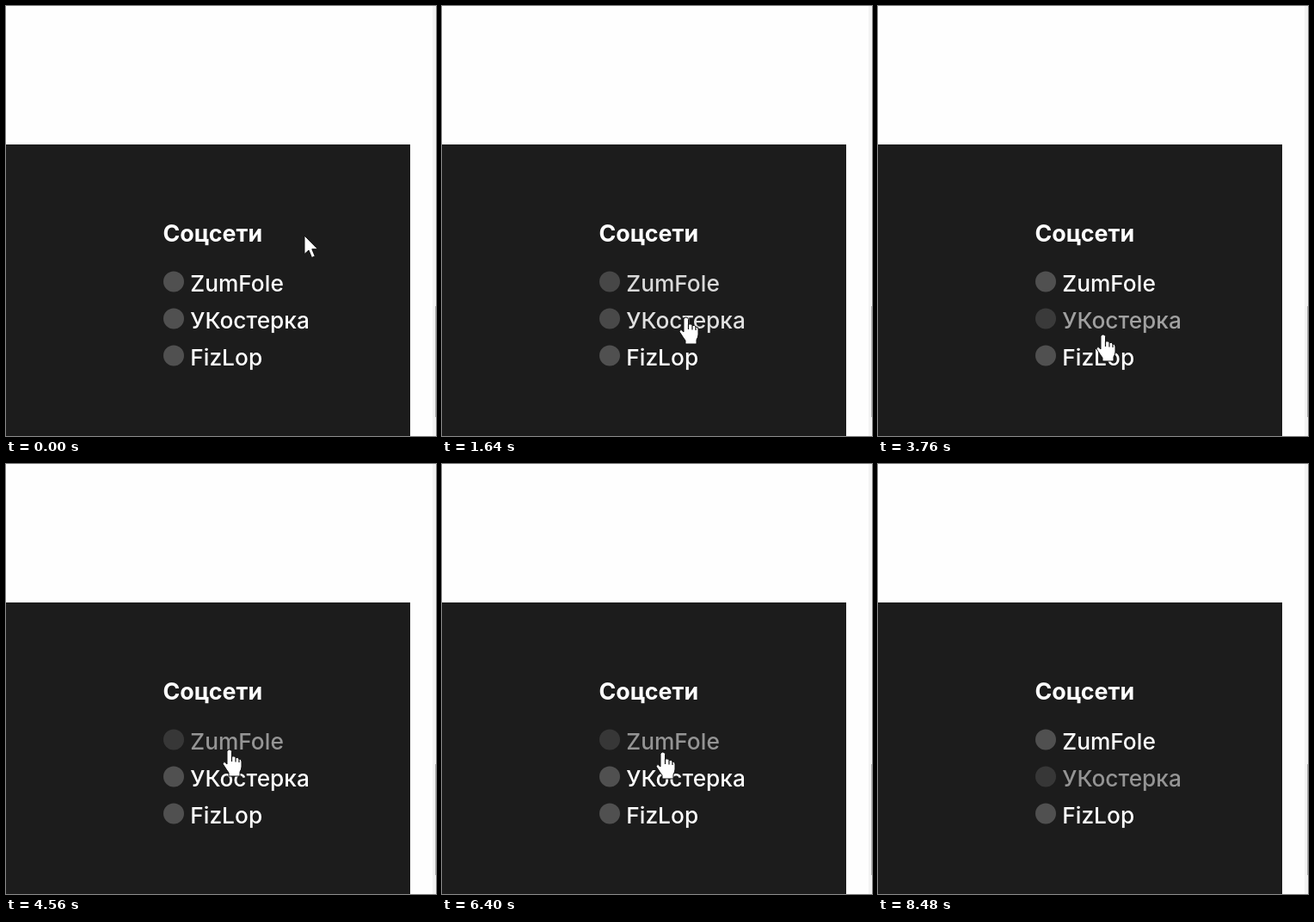
An HTML page that plays this animation: 500x500 px, repeating every 8.52 s.

```html
<!DOCTYPE html>
<html lang="ru">
<head>
<meta charset="utf-8">
<title>Соцсети</title>
<style>
  html, body { margin: 0; width: 100%; height: 100%; overflow: hidden; background: #fff; }
  svg { display: block; width: 100vw; height: 100vh; }
  text { font: 500 26.3px Inter, "Open Sans", sans-serif; fill: #fff; }
  .title { font-size: 26.8px; font-weight: 700; }
  .cursor path { fill: #fff; stroke: #111; stroke-linejoin: round; }
  .cursor .folds { fill: none; stroke-width: 1.2; }
</style>
</head>
<body>
<svg viewBox="0 0 500 500">
  <rect width="500" height="500" fill="#fefefe"/>
  <rect y="161" width="470" height="339" fill="#1c1c1c"/>
  <rect x="496" width="4" height="500" fill="#f3f3f3"/>
  <rect x="499" y="349" width="1" height="129" fill="#b0b0b0"/>
  <text class="title" x="182.5" y="274">Соцсети</text>
  <g id="links"></g>
  <g class="cursor" id="arrow">
    <path d="M0 0V21.5L5 17L8.5 25.5L12.3 24L8.8 15.7H15.5Z"/>
  </g>
  <g class="cursor" id="hand">
    <path d="M-3 2.5Q-3 0 -.3 0Q2.5 0 2.5 2.5V8Q6 7 7 9.5Q10 8.5 11 11Q14 10.5 14 14V20Q14 23 12 26V31H-1V27Q-4 23 -6 19.5Q-9 16.5 -7.5 15Q-6 13.5 -3 17Z"/>
    <path class="folds" d="M2.5 8V14M7 9.5V14.5M11 11V15"/>
  </g>
</svg>
<script>
const LOOP = 8520, STEP = 40, TICK = 10;
const FADE = 200, DIM = 0.47;
const ROW_Y = 323, ROW_GAP = 43, ROW_HALF = 17;
const START_Y = 267, TOP = 327, BOTTOM = 408;

// Times at which the pointer reverses: down, up, down...
const turns = [0, 900, 1380, 1950, 2400, 2800, 3400, 3980, 4520,
  4780, 5040, 5630, 6300, 6800, 7320, 7880, 8900];

const arrow = document.getElementById("arrow");
const hand = document.getElementById("hand");

const rows = ["ZumFole", "УКостерка", "FizLop"].map((name, i) => {
  const row = document.createElementNS("http://www.w3.org/2000/svg", "g");
  const y = ROW_Y + i * ROW_GAP;
  row.innerHTML = `<circle cx="195" cy="${y - 2.5}" r="12" fill="#505050"/>
    <text x="214.3" y="${y + 9.2}">${name}</text>`;
  document.getElementById("links").append(row);
  return row;
});

const turnY = i => i === 0 ? START_Y : i % 2 ? BOTTOM : TOP;

function pointer(t) {
  const next = turns.findIndex(time => time > t), last = next - 1;
  const u = (t - turns[last]) / (turns[next] - turns[last]);
  const eased = (1 - Math.cos(Math.PI * u)) / 2;
  return {
    x: 256 + 91 * Math.exp(-t / 1400),
    y: turnY(last) + (turnY(next) - turnY(last)) * eased
  };
}

const rowAt = y => rows.findIndex((_, i) => Math.abs(y - ROW_Y - i * ROW_GAP) <= ROW_HALF);

// Hover fades depend on earlier hovers, so lay out the whole loop once
const poses = [];
let levels = rows.map(() => 0);
for (let t = 0; t < LOOP; t += TICK) {
  const { x, y } = pointer(t), over = rowAt(y);
  levels = levels.map((v, i) =>
    Math.min(1, Math.max(0, v + (i === over ? TICK : -TICK) / FADE)));
  if (t % STEP === 0) poses.push({ x, y, over, levels });
}

const smooth = v => v * v * (3 - 2 * v);

function draw(n) {
  const { x, y, over, levels } = poses[n];
  rows.forEach((row, i) => row.setAttribute("opacity", 1 - DIM * smooth(levels[i])));
  // The pointer is gone in the closing step
  const shown = n < poses.length - 1 && (over < 0 ? arrow : hand);
  for (const cursor of [arrow, hand]) {
    cursor.setAttribute("transform", `translate(${Math.round(x)} ${Math.round(y)})`);
    cursor.setAttribute("visibility", cursor === shown ? "visible" : "hidden");
  }
}

const start = performance.now();
function tick() {
  draw(Math.floor((performance.now() - start) % LOOP / STEP));
  requestAnimationFrame(tick);
}
tick();
</script>
</body>
</html>
```
